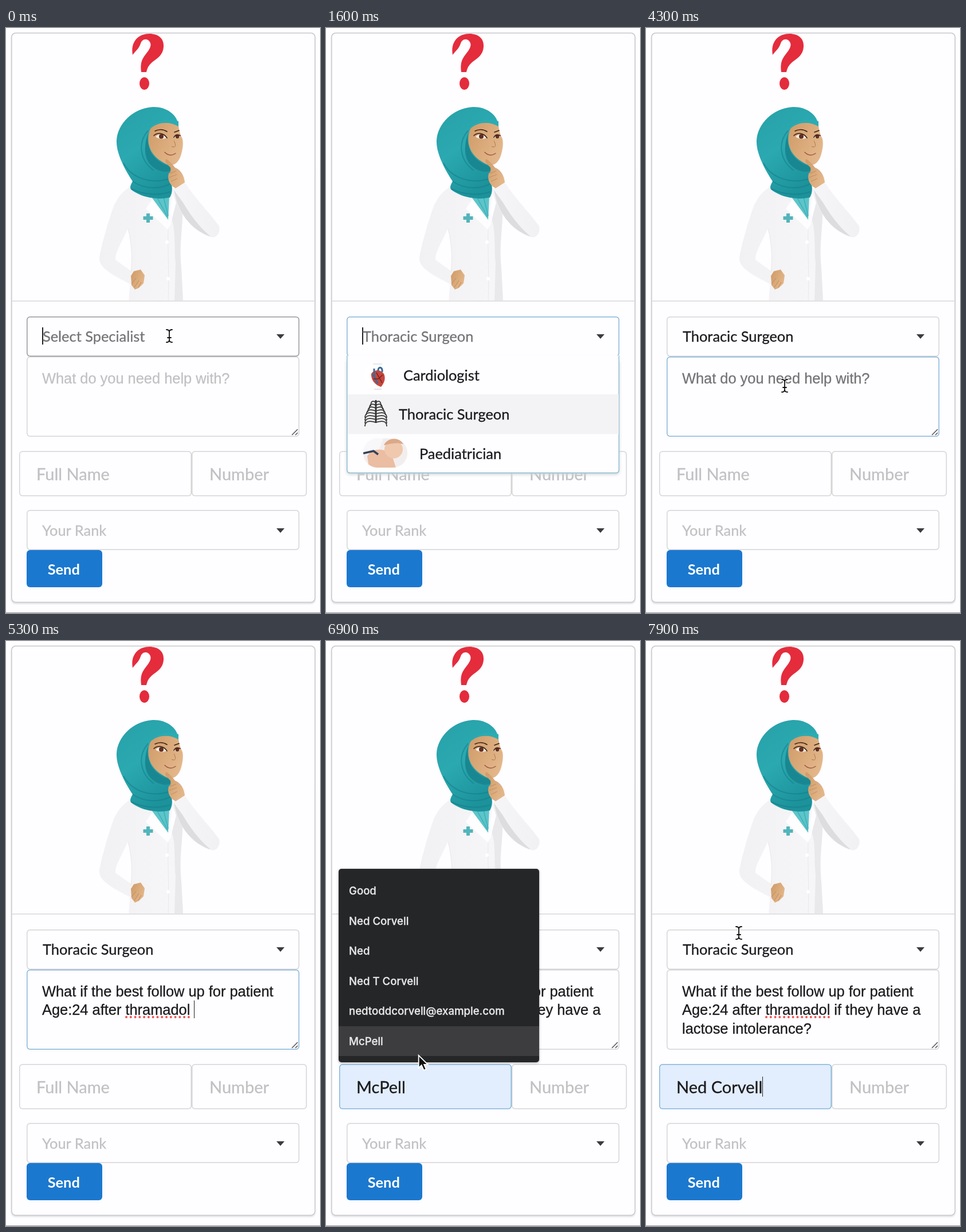
An HTML page that plays this animation: 548 px wide and 1022 px high, repeating every 8000 ms.

```html
<!DOCTYPE html>
<html lang="en">
<head>
<meta charset="utf-8">
<title>Ask a specialist</title>
<style>
html, body { margin: 0; width: 100%; height: 100%; overflow: hidden; background: #fefdff; }
#stage { position: relative; width: 548px; height: 1022px; overflow: hidden; font: 25.4px Lato, sans-serif; color: #1b1b1d; -webkit-text-stroke: .3px; }
#stage div, #stage svg { position: absolute; box-sizing: border-box; }
.card { left: 8.5px; top: 7.5px; width: 531px; height: 996px; border-radius: 8px; box-shadow: inset 0 0 0 1.5px #c9c8cb, 0 2px 3px #dddce0; }
.rule { left: 10px; top: 476px; width: 529px; height: 2px; background: #e1e0e3; }
.floor { left: 0; top: 1020.5px; width: 548px; height: 1.5px; background: #98979a; }
.field { --ring: #d5d4d7; display: flex; align-items: center; white-space: pre; overflow: hidden; border-radius: 6px; background: #fefdff; box-shadow: inset 0 0 0 1.5px var(--ring); }
.wide { left: 36px; width: 476px; }
.big { font-size: 29px; top: 739px; height: 79px; padding-left: 30px; }
.pale { color: #c1c0c3; }
.soft { color: #747376; }
.blue { --ring: #85b7d9; }
.dark { --ring: #98979a; }
#spec { top: 504px; height: 70px; padding: 0 0 2px 28px; }
#help { top: 574px; height: 140px; padding: 21.5px 0 0 27px; display: block; font: 25.4px/32.5px "Liberation Sans", Arial, sans-serif; }
#name { left: 23px; width: 301px; }
#name.filled { background: #e2edfd; }
#number { left: 324px; width: 201px; padding-left: 31px; }
#rank { top: 842px; height: 70px; padding-left: 27px; }
#send { left: 35.5px; top: 912px; width: 132.5px; height: 65px; border-radius: 6px; background: #1b78cf; color: #fff; font-weight: 700; line-height: 66px; text-align: center; padding-right: 2px; -webkit-text-stroke: 0; }
u { text-decoration: underline dotted #f0504c 4px; text-underline-offset: 2px; text-decoration-skip-ink: none; }
.caret { display: inline-block; width: 1.6px; height: 1.22em; margin: 0 -.8px; vertical-align: -.25em; background: #222; }
#options { --edge: #8fbfd2; left: 36px; top: 572px; width: 476px; height: 206px; background: #fefdff; border-radius: 0 0 6px 6px; overflow: hidden; box-shadow: inset 1.5px 0 var(--edge), inset -1.5px 0 var(--edge), inset 0 -1.5px var(--edge); }
#optionsShadow { left: 36px; top: 580px; width: 476px; height: 198px; border-radius: 0 0 6px 6px; box-shadow: 0 2px 5px #cfd2d6; }
#options div { left: 1.5px; width: 473px; height: 68.3px; line-height: 67px; border-top: 1px solid #faf9fb; }
#options .on { background: #f3f2f4; border-color: #f3f2f4; }
#options svg { left: 0; top: 0; }
#fill { left: 22px; top: 398px; width: 350px; height: 338px; border-radius: 5px; background: #252628; color: #e9e9ea; font: 500 18.6px/52.5px Inter, sans-serif; box-shadow: 0 1px 4px #0005; }
#fill div { left: 0; width: 350px; height: 52.5px; padding-left: 18px; }
#fill .on { background: #3d3d3f; }
</style>
</head>
<body>
<div id="stage">
  <div class="card"></div>
  <svg width="548" height="477" viewBox="0 0 548 477">
    <defs>
      <linearGradient id="scarf" x1="0" y1="0" x2=".5" y2="1">
        <stop offset="0" stop-color="#27a0a8"/><stop offset=".5" stop-color="#2ba9b0"/><stop offset="1" stop-color="#1c929b"/>
      </linearGradient>
      <linearGradient id="skin" x2="1" y2=".6">
        <stop offset="0" stop-color="#cf9a66"/><stop offset="1" stop-color="#e3b78b"/>
      </linearGradient>
      <linearGradient id="coat" x2="1">
        <stop offset="0" stop-color="#f1f0f3"/><stop offset=".6" stop-color="#f6f5f8"/><stop offset="1" stop-color="#f1f0f3"/>
      </linearGradient>
    </defs>
    <g fill="#e42c3c">
      <path d="M221 47C217 24 231 10 250 10C267 10 276 19 275 33C274 47 265 52 256 59C249 65 247 69 245 77H236C234 62 237 55 243 47C250 38 256 30 250 23C245 17 237 20 235 27C232 36 227 39 221 47Z"/>
      <ellipse cx="241.500" cy="97" rx="8.500" ry="11"/>
    </g>
    <!-- coat and arms -->
    <path fill="url(#coat)" d="M218 277C198 288 190 304 183 326C175 350 167 379 163 400C162 414 173 422 188 432L219 449L226 430L191 405C190 393 202 374 213 350C218 376 220 394 219 415L214 477H309L306 420C302 380 308 350 308 326C328 345 346 359 361 366C370 364 374 356 372 346C354 321 330 298 313 271L291 281L286 293L252 297Z"/>
    <path fill="#dddcde" d="M293 283L309 305C318 320 333 344 358 365C333 356 319 342 309 326C302 315 296 299 293 283Z"/>
    <path fill="#e9e8ea" d="M288 330C297 354 293 382 296 410L294 477H309L306 420C302 380 308 350 308 326L292 290Z"/>
    <path fill="#fefdff" d="M256 298L283 335L291 288L297 305L287 344L282 352L244 316Z"/>
    <path fill="#5cc5ca" d="M255 297L283 335L285 293Z"/>
    <path fill="none" stroke="#3fb0b6" stroke-width="1.500" d="M264 297L282 330M275 296L283 328"/>
    <path fill="none" stroke="#e9e8eb" d="M283 352C282 390 285 430 283 477M213 350C220 380 221 398 218 427"/>
    <g fill="#fff"><circle cx="281" cy="374" r="3"/><circle cx="283" cy="438" r="3"/></g>
    <path fill="none" stroke="#52b5bb" stroke-width="6" d="M239.500 332H256.500M248 324V340"/>
    <path fill="url(#skin)" d="M218 433L223 425L235 422L242 432L240 446L232 454L225 457L219 449Z"/>
    <path fill="none" stroke="#b98356" stroke-width=".8" d="M219 447L227 437M224 453L232 441M231 453L236 444"/>
    <!-- scarf and face -->
    <path fill="url(#scarf)" d="M258 138C222 139 194 168 193 197C192 218 207 247 221 268C217 274 216 279 218 282C236 296 263 301 286 296C291 287 291 278 287 266C293 254 294 248 291 240L301 172C300 151 280 138 258 138Z"/>
    <path fill="#198791" d="M248 183C245 208 254 227 276 238L290 244C289 252 274 254 261 246C239 233 240 207 248 183Z"/>
    <path fill="none" stroke="#147d87" stroke-width="2" stroke-opacity=".55" d="M205 236C219 262 252 274 286 263M221 268C242 282 268 282 287 272M219 281C240 292 267 293 287 286M248 179C228 202 235 233 258 249"/>
    <path fill="url(#skin)" d="M252 176C263 165 282 162 301 171C302 179 304 186 308 194C310 202 308 216 304 226C300 235 293 241 285 240C269 234 255 222 251 209C247 199 248 185 252 176Z"/>
    <path fill="#2cacb2" d="M250 179C259 163 279 160 301 172L301 163C282 156 258 163 250 179Z"/>
    <path fill="#f6efe9" d="M261 190C266 184 275 184 280 192C274 195 266 194 261 190ZM294 191C296 186 300 186 304 190C301 193 297 194 294 191Z"/>
    <g fill="#61301f"><circle cx="271" cy="189.500" r="4"/><circle cx="299" cy="189.500" r="3.400"/></g>
    <g fill="none" stroke="#3a211a" stroke-width="1.600" stroke-linecap="round">
      <path d="M258 188C264 182 275 183 281 192M293 191C296 185 301 186 304 188"/>
      <path d="M260 180C268 176 275 177 281 181M294 182L302 179"/>
    </g>
    <path fill="none" stroke="#b5774b" d="M293 197C296 203 297 207 293 208L289 207"/>
    <path fill="none" stroke="#9a5540" stroke-width="1.400" stroke-linecap="round" d="M277 217C283 223 290 223 296 219"/>
    <path fill="url(#skin)" d="M279 229C282 229 289 236 295 244C304 247 311 257 312 270L296 280C286 275 281 265 284 254C287 252 288 249 287 244L278 234Z"/>
    <path fill="none" stroke="#bd8658" stroke-width=".8" d="M286 254L297 250M285 261L298 256M288 268L299 263"/>
  </svg>
  <div class="rule"></div>
  <div class="floor"></div>

  <div class="field wide" id="spec"></div>
  <div class="field wide" id="help"></div>
  <div class="field big" id="name"></div>
  <div class="field big pale" id="number">Number</div>
  <div class="field wide pale" id="rank">Your Rank</div>
  <div id="send">Send</div>
  <svg width="548" height="1022">
    <path fill="#3c3b3e" d="M472 535H486L479 543ZM472 874H486L479 882Z"/>
    <path stroke="#555457" stroke-width="1.500" d="M499 711L509 701M505 711L509 707"/>
  </svg>

  <div id="optionsShadow"></div>
  <div id="options">
    <div style="top:0;padding-left:97.500px">Cardiologist</div>
    <div style="top:68.300px;padding-left:89.500px">Thoracic Surgeon</div>
    <div style="top:136.600px;padding-left:125.500px">Paediatrician</div>
    <svg width="476" height="206" viewBox="36 572 476 206">
      <circle cx="90" cy="607" r="24" fill="#fff"/>
      <path fill="#c4473d" d="M79 604C84 596 95 596 101 604C105 613 101 621 96 627C86 624 78 615 79 604Z"/>
      <path fill="none" stroke="#386c9d" stroke-width="3" d="M84 609V595M91 599C91 590 99 592 98 601M82 605L90 621"/>
      <path fill="none" stroke="#71231f" stroke-width="1.500" d="M88 602L98 620M99 606L91 613L83 613"/>
      <path stroke="#ccc" d="M82 587H98M84 631H97"/>
      <g id="ribs" fill="none" stroke="#333" stroke-width="1.600"></g>
      <clipPath id="pill"><rect x="65" y="717" width="77" height="51" rx="25"/></clipPath>
      <g clip-path="url(#pill)">
        <path fill="#f3eeee" d="M65 717H142V768H65Z"/>
        <path fill="#f8f7fa" d="M65 717H100L90 744H65Z"/>
        <path fill="#ebbda2" d="M72 748C82 731 103 736 114 743L122 768H75Z"/>
        <circle cx="118" cy="736" r="16" fill="#f0c8ae"/>
        <path fill="#dba988" d="M101 729C105 717 127 712 135 727C121 723 111 727 101 729Z"/>
        <path fill="none" stroke="#34425a" stroke-width="3.500" d="M65 743L83 739L91 745"/>
      </g>
    </svg>
  </div>

  <div id="fill"></div>
  <svg id="cursor" width="548" height="1022">
    <g id="beam" fill="none" stroke-linecap="round">
      <path id="beamShape" stroke="#fff" stroke-width="4" d="M-5 -11Q0 -11 0 -7Q0 -11 5 -11M0 -7V7M-5 11Q0 11 0 7Q0 11 5 11M-3 3H3"/>
      <path stroke="#111" stroke-width="1.800" d="M-5 -11Q0 -11 0 -7Q0 -11 5 -11M0 -7V7M-5 11Q0 11 0 7Q0 11 5 11M-3 3H3"/>
    </g>
    <path id="arrow" fill="#111" stroke="#fff" stroke-width="1.800" d="M0 -1V21L5 16L9 25L13 23L9.500 15H16Z"/>
  </svg>
</div>
<script>
const $ = id => document.getElementById(id);
const LOOP = 8000, STEP = 100;
const QUESTION = 'What if the best follow up for patient\nAge:24 after thramadol if they have a\nlactose intolerance?';
const TYPE_FROM = 4500, TYPE_TO = 5900;
const SUGGESTIONS = ['Good', 'Ned Corvell', 'Ned', 'Ned T Corvell', 'nedtoddcorvell@example.com', 'McPell'];
const ROW_TOP = 410, ROW_HEIGHT = 52.5;

// Each entry changes only the listed parts of the state.
const timeline = [
  [0, { focus: 'spec', ring: 'spec', spec: 'Select Specialist', specTone: 'soft', open: false, row: 0, blink: 0, cursor: true, fill: false, name: '' }],
  [200, { open: true, spec: 'Cardiologist', blink: 200 }],
  [1300, { row: 1, spec: 'Thoracic Surgeon', cursor: false }],
  [2300, { open: false, specTone: '', blink: 2300 }],
  [3200, { cursor: true }],
  [3800, { focus: 'help', ring: 'help', blink: 3800 }],
  [TYPE_FROM, { cursor: false }],
  [TYPE_TO, { blink: TYPE_TO }],
  [6000, { cursor: true }],
  [6300, { focus: 'name', blink: 6300 }],
  [6400, { ring: 'name' }],
  [6600, { fill: true }],
  [7600, { fill: false, name: SUGGESTIONS[1], blink: 7600 }]
];

// time, x, y
const path = [
  [0, 285, 538], [3200, 285, 538], [3700, 242, 625], [6000, 242, 625], [6200, 164, 775],
  [6700, 164, 775], [7300, 155, 582], [7500, 157, 492], [7600, 157, 490], [7900, 162, 510]
];

function cursorAt(t) {
  const i = Math.max(1, path.findIndex(p => p[0] >= t));
  const [a, b] = [path[i - 1], path[i]];
  const u = (t - a[0]) / (b[0] - a[0]);
  const k = u * u * (3 - 2 * u);
  return [a[1] + (b[1] - a[1]) * k, a[2] + (b[2] - a[2]) * k];
}

function setField(id, html, tone) {
  if ($(id).innerHTML !== html) $(id).innerHTML = html;
  $(id).className = `field ${id === 'name' ? 'big' : 'wide'} ${tone}`;
}

function render(t) {
  const s = Object.assign({}, ...timeline.filter(e => e[0] <= t).map(e => e[1]));
  const [x, y] = cursorAt(t);
  const typing = t >= TYPE_FROM && t < TYPE_TO;
  const lit = typing || (t - s.blink) % 1000 < 500;
  const caret = id => s.focus === id && lit ? '<i class="caret"></i>' : '';

  setField('spec', `${caret('spec')}<span>${s.spec}</span>`,
    `${s.specTone} ${s.open ? 'blue' : s.ring === 'spec' ? 'dark' : ''}`);

  const part = Math.min(1, Math.max(0, (t - TYPE_FROM + STEP) / (TYPE_TO - TYPE_FROM)));
  const typed = t < TYPE_FROM ? '' : QUESTION.slice(0, Math.round(part * QUESTION.length));
  setField('help', typed
    ? typed.replace('thramadol ', '<u>thramadol</u> ') + caret('help')
    : caret('help') + 'What do you need help with?',
    `${typed ? '' : s.focus === 'help' ? 'soft' : 'pale'} ${s.ring === 'help' ? 'blue' : ''}`);

  const hovered = s.fill && y < 725 ? Math.floor((y - ROW_TOP) / ROW_HEIGHT) : -1;
  const value = s.name || SUGGESTIONS[hovered] || '';
  const text = `<span>${value || 'Full Name'}</span>`;
  setField('name', s.name ? text + caret('name') : caret('name') + text,
    `${value ? 'filled' : s.focus === 'name' ? 'soft' : 'pale'} ${s.ring === 'name' ? 'blue' : ''}`);

  $('options').style.display = $('optionsShadow').style.display = s.open ? '' : 'none';
  options.forEach((row, i) => row.classList.toggle('on', i === s.row));
  $('fill').style.display = s.fill ? '' : 'none';
  fillRows.forEach((row, i) => row.classList.toggle('on', i === hovered));

  const asArrow = s.fill ? y < 736 : t >= 7600 && y < 504;
  $('cursor').style.display = s.cursor ? '' : 'none';
  $('beam').style.display = asArrow ? 'none' : '';
  $('arrow').style.display = asArrow ? '' : 'none';
  for (const id of ['beam', 'arrow']) $(id).setAttribute('transform', `translate(${x} ${y})`);
}

$('fill').innerHTML = SUGGESTIONS.map((label, i) =>
  `<div style="top:${ROW_TOP - 398 + i * ROW_HEIGHT}px">${label}</div>`).join('');
const fillRows = [...$('fill').children];
const options = [...document.querySelectorAll('#options > div')];

let ribs = '<path stroke-width="3" d="M87 650V690"/>';
for (let i = 0; i < 8; i++) {
  const y = 654 + i * 5, w = 9 + Math.min(10, i * 2.5);
  ribs += `<path d="M87 ${y}Q${87 - w} ${y - 6} ${87 - w} ${y + 7}M87 ${y}Q${87 + w} ${y - 6} ${87 + w} ${y + 7}"/>`;
}
$('ribs').innerHTML = ribs;

const start = performance.now();
function tick() {
  const t = (performance.now() - start) % LOOP;
  render(Math.floor(t / STEP) * STEP);
  requestAnimationFrame(tick);
}
tick();
</script>
</body>
</html>
```
